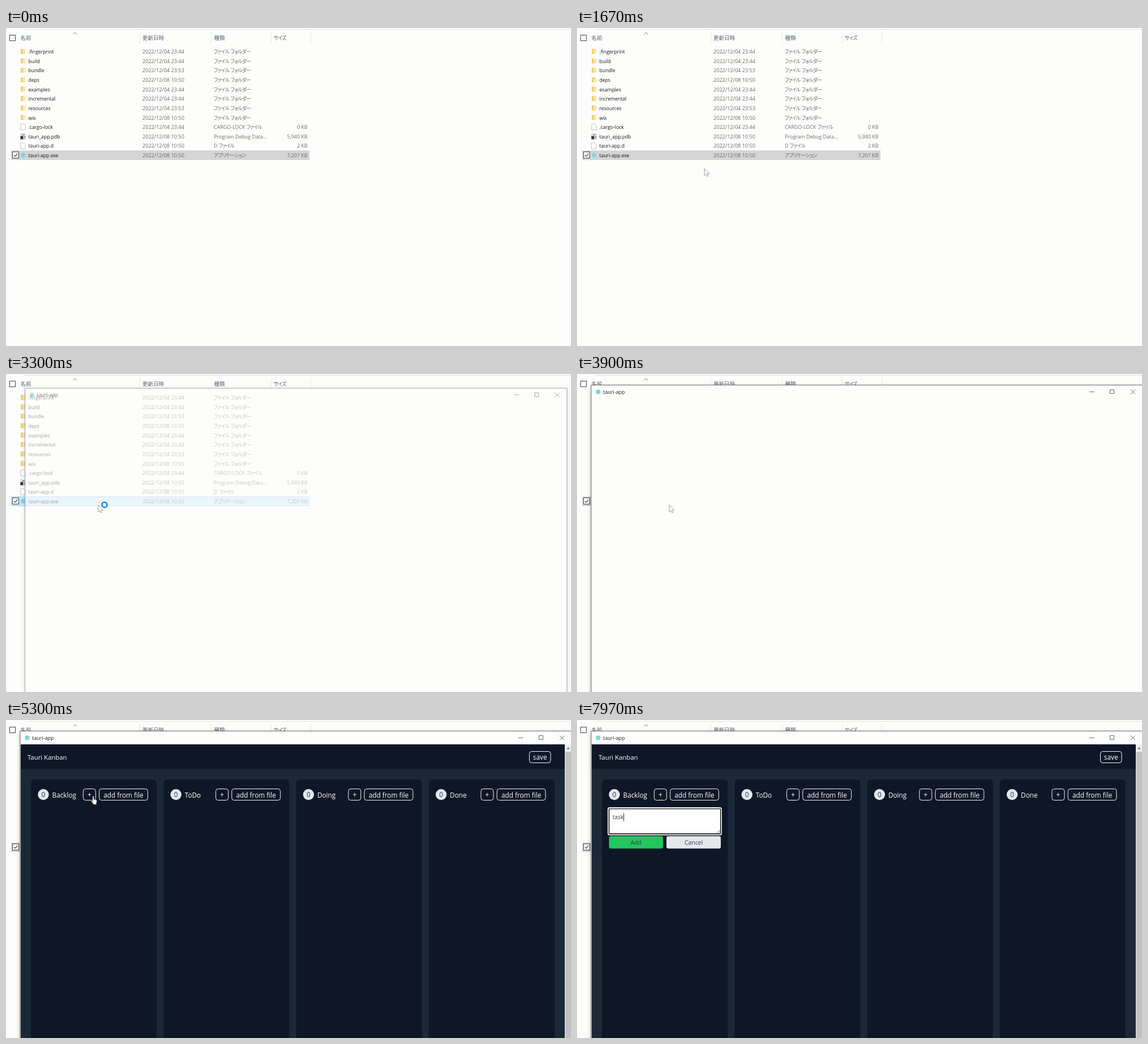
These frames come from a looping animation (998 px wide and 561 px high, 8 s). An HTML page:

```html
<!DOCTYPE html>
<html lang="ja">
<head>
<meta charset="utf-8">
<title>Kanban app demo</title>
<style>
html, body { margin: 0; width: 100%; height: 100%; overflow: hidden; background: #fdfdfb; }
svg { display: block; width: 998px; height: 561px; overflow: hidden; }
text { font-family: "Open Sans", "Noto Sans CJK JP", "Noto Sans CJK", sans-serif; white-space: pre; }

/* File list */
.name { font-size: 8.6px; fill: #1a1a1a; }
.info { font-size: 9.1px; fill: #6c6c6c; }
.kind { font-size: 8.9px; fill: #6c6c6c; }
.head { font-size: 9.5px; fill: #566172; }
.kana { font-size: 8.8px; letter-spacing: -.75px; font-feature-settings: "palt"; }
.end { text-anchor: end; }

/* Board */
.label { font-size: 11.8px; fill: #fff; }
.mid { text-anchor: middle; }
.btn { fill: none; stroke: #f4f5f7; }
.dark { fill: #0e1726; }
.small { font-size: 10.4px; fill: #33404a; }
.line { fill: none; stroke: #444; }

/* One shared 8 s clock */
.a { animation: 8s step-end infinite; }
#blue { animation-name: blue; }
#win { animation: win 8s linear infinite; transform-origin: 512px 336px; }
#board { animation-name: board; }
#form { animation-name: form; }
#focus { animation-name: focus; }
#caret { animation-name: caret; }
#add { animation: add 8s linear infinite; }
.k0 { animation-name: k0; }
.k1 { animation-name: k1; }
.k2 { animation-name: k2; }
.k3 { animation-name: k3; }
#cursor { animation: path 8s linear infinite; }
#arrow { animation-name: arrow; }
#busy { animation-name: busy; }
#hand { animation-name: hand; }
#beam { animation-name: beam; }

@keyframes blue { 0% { visibility: hidden } 28.75% { visibility: visible } 43.1% { visibility: hidden } }
@keyframes win {
  0%, 40.375% { opacity: 0; transform: scale(.953); animation-timing-function: cubic-bezier(.215, .61, .355, 1) }
  43.75%, 100% { opacity: 1; transform: none }
}
@keyframes board { 0% { visibility: hidden } 51.6% { visibility: visible } }
@keyframes form { 0% { visibility: hidden } 78.72% { visibility: visible } }
@keyframes focus { 0% { visibility: hidden } 86.6% { visibility: visible } }
@keyframes caret {
  0% { visibility: hidden; transform: none }
  86.6% { visibility: visible; transform: none }
  93.35% { visibility: hidden; transform: none }
  95.85% { visibility: visible; transform: translateX(3.6px) }
  97.1% { visibility: visible; transform: translateX(9.3px) }
  98.35% { visibility: visible; transform: translateX(14.2px) }
  99.6% { visibility: visible; transform: translateX(19.4px) }
}
@keyframes add { 0%, 95.85% { fill: #bbf7d0 } 97.72%, 100% { fill: #22c55e } }
@keyframes k0 { 0% { visibility: hidden } 95.85% { visibility: visible } }
@keyframes k1 { 0% { visibility: hidden } 97.1% { visibility: visible } }
@keyframes k2 { 0% { visibility: hidden } 98.35% { visibility: visible } }
@keyframes k3 { 0% { visibility: hidden } 99.6% { visibility: visible } }
@keyframes path {
  0%, .375% { transform: translate(833px, 150px) }
  10.375% { transform: translate(678px, 246px) }
  15.5% { transform: translate(520px, 423px) }
  20.8%, 21.25% { transform: translate(225px, 248px) }
  27.5%, 53.375% { transform: translate(163px, 231px); animation-timing-function: ease-in-out }
  60.875%, 64.625% { transform: translate(157px, 139px) }
  68% { transform: translate(151px, 128px) }
  72.125%, 82.875% { transform: translate(143px, 137px) }
  83.75%, 100% { transform: translate(152px, 165px) }
}
@keyframes arrow { 0% { visibility: hidden } .375% { visibility: visible } 60% { visibility: hidden } }
@keyframes busy { 0% { visibility: hidden } 35% { visibility: visible } 48.6% { visibility: hidden } }
@keyframes hand { 0% { visibility: hidden } 60% { visibility: visible } 83.3% { visibility: hidden } }
@keyframes beam { 0% { visibility: hidden } 83.3% { visibility: visible } 95.85% { visibility: hidden } }
</style>
</head>
<body>
<svg viewBox="0 0 998 561">
  <rect width="998" height="561" fill="#fdfdfb"/>

  <path d="M32 2.5H998" stroke="#e2e2de"/>
  <path d="M236.5 7V27M362.5 7V27M468.5 7V27M538.5 7V27" stroke="#e9e9e4"/>
  <path class="line" d="M118.5 11L121.7 8L125 11" style="stroke:#777"/>
  <rect class="line" x="6.5" y="12.5" width="10" height="10"/>
  <g class="head">
    <text x="25.5" y="21">名前</text>
    <text x="241" y="21">更新日時</text>
    <text x="367.5" y="21">種類</text>
    <text x="473" y="21" class="kana">サイズ</text>
  </g>
  <rect x="9" y="216" width="527" height="17" fill="#d5d5d5"/>
  <rect id="blue" class="a" x="9.5" y="216.5" width="526" height="16" fill="#cce8ff" stroke="#99d1ff"/>
  <rect class="line" x="11.5" y="218.5" width="11" height="11" style="fill:#fff"/>
  <path class="line" d="M14 224L16.2 226.3L20.2 221.5" stroke-width="1.2"/>
  <g id="list"></g>

  <g id="win">
    <rect x="25" y="19.5" width="974.5" height="632.5" fill="#fdfdfb" stroke="#707070"
      style="filter:drop-shadow(0 2px 3px rgba(0,0,0,.28))"/>
    <circle cx="37.4" cy="31.5" r="4.3" fill="#86d3da"/>
    <text x="46" y="35" style="font-size:9px" fill="#1e1e1e">tauri-app</text>
    <path class="line" d="M905 31.5H913.5M941.5 27.5H948.5V34.5H941.5ZM978 27.5L986 35.5M986 27.5L978 35.5" stroke-width=".8"/>

    <g id="board" class="a">
      <rect x="26" y="43" width="961" height="609" fill="#1b2836"/>
      <rect class="dark" x="26" y="43" width="961" height="43.5"/>
      <rect x="987" y="43" width="12" height="609" fill="#f0f0f0"/>
      <rect x="988" y="56" width="11" height="596" fill="#c1c1c1"/>
      <path d="M990 51.5L993 48L996 51.5Z" fill="#777"/>
      <text class="label" x="38" y="70" style="font-size:11.35px">Tauri Kanban</text>
      <rect class="btn" x="924.5" y="55.5" width="37.5" height="20" rx="4"/>
      <text class="label mid" x="943.2" y="70">save</text>
      <g id="cols"></g>
    </g>

    <g id="form" class="a">
      <rect x="56.5" y="156.5" width="197.5" height="44.5" fill="#fff" stroke="#8b8b8b"/>
      <g id="focus" class="a" fill="none">
        <rect x="55" y="155" width="200" height="47.5" rx="2.5" stroke="#fff" stroke-width="1.8"/>
        <rect x="56.6" y="156.6" width="197" height="44.2" rx="1" stroke="#101010" stroke-width="1.4"/>
      </g>
      <path class="line" d="M247 199.5L252.5 194M250 199.5L252.5 197" stroke-width=".9"/>
      <rect id="add" x="56.5" y="205" width="95.5" height="21.7" rx="3.2"/>
      <rect x="158" y="205" width="96" height="21.7" rx="3.2" fill="#e5e7eb"/>
      <text class="small mid" x="104.2" y="220">Add</text>
      <text class="small mid" x="206" y="220">Cancel</text>
      <text class="small" x="62.7" y="175.3" style="font-size:10.2px"><tspan class="a k0">t</tspan><tspan class="a k1">a</tspan><tspan class="a k2">s</tspan><tspan class="a k3">k</tspan></text>
      <rect id="caret" class="a" x="62.6" y="164.5" width="1" height="14" fill="#111"/>
    </g>
  </g>

  <g id="cursor">
    <path id="arrow" class="a" d="M0 0V12.3L2.9 9.7L4.9 14L6.7 13.2L4.9 9.1H8.6Z" fill="#fff" stroke="#777" stroke-width=".7"/>
    <circle id="busy" class="a" cx="11" cy="-.3" r="4.5" fill="#fff" stroke="#1488e6" stroke-width="2.6"/>
    <path id="hand" class="a" d="M-1.2 1Q0-1 1.3 1V6L5.4 7Q6.8 7.4 6.6 9L5.8 13V15.6H-.5V13.5L-3.8 9.8Q-3.8 8-2 8.6L-1.2 9.5Z" fill="#fff" stroke="#111" stroke-width=".8"/>
    <path id="beam" class="a line" d="M-2.5-6.5H2.5M0-6.5V6.5M-2.5 6.5H2.5" style="stroke:#111"/>
  </g>
</svg>
<script>
const put = (id, html) => { document.getElementById(id).innerHTML = html; };
const kana = s => s.replace(/[ァ-ー]+/g, '<tspan class="kana">$&</tspan>');

const page = y => `<path d="M25.8 ${y - 5.5}H32L34.2 ${y - 3.3}V${y + 5}H25.8Z" fill="#fff" stroke="#aaa" stroke-width=".7"/>`;
const icons = {
  folder: y => `<rect x="26" y="${y - 5}" width="7.5" height="9" rx=".8" fill="#fbe09a"/>
    <rect x="26" y="${y - 5}" width="3" height="9" rx=".8" fill="#f3cf70"/>`,
  page,
  debug: y => page(y) + `<rect x="25.5" y="${y - 1}" width="5" height="5.5" fill="#333"/>
    <path d="M28 ${y - 3}H33M31.5 ${y}H34M31.5 ${y + 2.5}H34" stroke="#333"/>`,
  app: y => `<circle cx="30" cy="${y - .5}" r="4.2" fill="#86d3da"/>`
};

const early = '2022/12/04 23:44', bundled = '2022/12/04 23:53', late = '2022/12/08 10:50';
const dir = (name, date) => [name, date, 'ファイル フォルダー', '', 'folder'];
const files = [
  dir('.fingerprint', early), dir('build', early), dir('bundle', bundled), dir('deps', late),
  dir('examples', early), dir('incremental', early), dir('resources', bundled), dir('wix', late),
  ['.cargo-lock', early, 'CARGO-LOCK ファイル', '0 KB', 'page'],
  ['tauri_app.pdb', late, 'Program Debug Data...', '5,940 KB', 'debug'],
  ['tauri-app.d', late, 'D ファイル', '2 KB', 'page'],
  ['tauri-app.exe', late, 'アプリケーション', '7,207 KB', 'app']
];
put('list', files.map(([name, date, kind, size, icon], i) => {
  const y = 41.8 + i * 16.63, base = y + 3.3;
  return icons[icon](y) + `<text class="name" x="39.5" y="${base}">${name}</text>
    <text class="info" x="241" y="${base}">${date}</text>
    <text class="kind" x="367" y="${base}">${kana(kind)}</text>
    <text class="kind end" x="532.5" y="${base}">${size}</text>`;
}).join(''));

put('cols', ['Backlog', 'ToDo', 'Doing', 'Done'].map((title, i) => `
  <g transform="translate(${44.2 + i * 234.2} 0)">
    <rect class="dark" y="105" width="222" height="560" rx="6"/>
    <circle cx="21.8" cy="131.5" r="9.7" fill="#e2e8f0"/>
    <text class="label mid" x="21.8" y="136" style="fill:#333c4a">0</text>
    <text class="label" x="37.3" y="136.5">${title}</text>
    <rect class="btn" x="92.2" y="121.5" width="22" height="20" rx="4"/>
    <text class="label mid" x="103.2" y="136.2">+</text>
    <rect class="btn" x="120.4" y="121.5" width="85.8" height="20" rx="4"/>
    <text class="label mid" x="163.3" y="136.5">add from file</text>
  </g>`).join(''));
</script>
</body>
</html>
```
